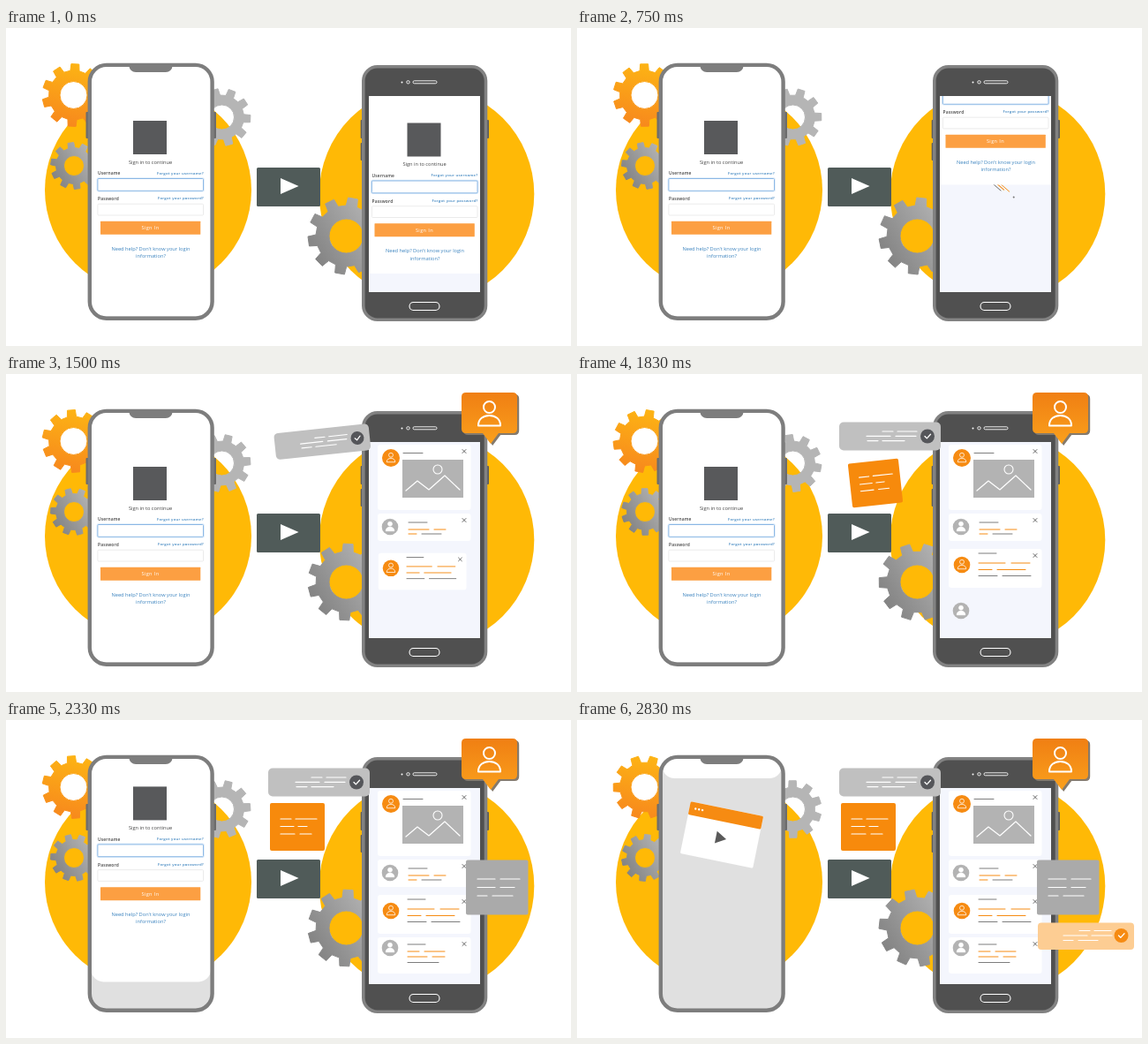
Write an HTML page that moves like this. It is 640 by 360 pixels and loops after 2.91 s.

```html
<!DOCTYPE html>
<html lang="en">
<head>
<meta charset="utf-8">
<title>App sign-in</title>
<style>
html, body { margin: 0; width: 100%; height: 100%; overflow: hidden; background: #fff; }
svg { display: block; width: 100vw; height: 100vh; font-family: "Open Sans", sans-serif; }
</style>
</head>
<body>
<svg id="stage" viewBox="0 0 640 360" xmlns="http://www.w3.org/2000/svg"></svg>
<script>
const LOOP = 2910, STEP = 1000 / 12;
const ORANGE = '#f68b12', GREY = '#b3b3b3', DARK = '#7d7d7d';

const rect = (x, y, w, h, r, fill, more = '') =>
  `<rect x="${x}" y="${y}" width="${w}" height="${h}" rx="${r}" fill="${fill}" ${more}/>`;
const disc = (x, y, r, fill, more = '') =>
  `<circle cx="${x}" cy="${y}" r="${r}" fill="${fill}" ${more}/>`;
const stroke = (d, color, w = 1) =>
  `<path d="${d}" fill="none" stroke="${color}" stroke-width="${w}" stroke-linecap="round" stroke-linejoin="round"/>`;
const text = (x, y, size, fill, str, more = '') =>
  `<text x="${x}" y="${y}" font-size="${size}" fill="${fill}" ${more}>${str}</text>`;
const group = (id, body) => `<g id="${id}">${body}</g>`;
const bar = (x1, x2, y, color = '#fff', w = 1.2) => stroke(`M${x1} ${y}H${x2}`, color, w);
const gradient = (id, a, b, dir) =>
  `<linearGradient id="${id}" ${dir}><stop stop-color="${a}"/><stop offset="1" stop-color="${b}"/></linearGradient>`;

// Gears turn at one shared speed; turn is the first angle in degrees
const TEETH = 10, SPIN = 3.6;
const gears = [
  { x: 76.5, y: 76, outer: 35.5, inner: 28, hole: 15.5, turn: -87, fill: 'url(#gOrange)' },
  { x: 77, y: 156, outer: 26.5, inner: 20.5, hole: 11.5, turn: -98, fill: 'url(#gSteel)' },
  { x: 244.5, y: 101, outer: 32.5, inner: 25, hole: 14, turn: -69, fill: '#b5b5b5' },
  { x: 385.5, y: 235.5, outer: 43.5, inner: 34.5, hole: 19.5, turn: -80, fill: 'url(#gSteel)' }
];

function gearPath(g, turn) {
  const pitch = 360 / TEETH, pts = [];
  for (let i = 0; i < TEETH; i++) {
    for (const [k, r] of [[-.29, g.inner], [-.2, g.outer], [.2, g.outer], [.29, g.inner]]) {
      const a = (turn + (i + k) * pitch) * Math.PI / 180;
      pts.push((g.x + r * Math.cos(a)).toFixed(2) + ' ' + (g.y + r * Math.sin(a)).toFixed(2));
    }
  }
  const h = g.hole;
  return `M${pts.join('L')}zM${g.x - h} ${g.y}a${h} ${h} 0 1 0 ${2 * h} 0a${h} ${h} 0 1 0 ${-2 * h} 0z`;
}

const gearArt = g => `<path class="gear" fill="${g.fill}" fill-rule="evenodd"
  stroke="${g.fill}" stroke-width="1" stroke-linejoin="round"/>`;

function person(x, y, s, fill = 'none') {
  return `<g transform="translate(${x} ${y}) scale(${s})">` +
    `<g fill="${fill}" stroke="#fff" stroke-width="2" stroke-linejoin="round">` +
    `<circle cy="-7.5" r="6.5"/><path d="M-12.5 13.5C-13 -2 13 -2 12.5 13.5z"/></g></g>`;
}

const check = (x, y, fill) =>
  disc(x, y, 8, fill) + stroke(`M${x - 3} ${y}l2.3 2.4l4.2 -4.6`, '#fff', 1.3);

function login() {
  const blue = '#3d84bf', ink = '#444', mid = 'text-anchor="middle"';
  const label = 'font-weight="600" letter-spacing=".15"';
  const end = 'text-anchor="end" font-weight="600" letter-spacing=".24"';
  return rect(144, 105, 38, 38, 0, '#58595b') +
    text(163.5, 153.5, 5.7, ink, 'Sign in to continue', mid) +
    text(104, 166.3, 4.9, ink, 'Username', label) +
    text(224, 165.6, 4.3, blue, 'Forgot your username?', end) +
    rect(103.2, 169.8, 121, 15.2, 1.5, 'none', 'stroke="#dcebf9" stroke-width="1.2"') +
    rect(103.9, 170.5, 119.6, 13.8, 1, '#fff', 'stroke="#7fb0e2" stroke-width=".9"') +
    text(104, 195.1, 4.9, ink, 'Password', label) +
    text(224, 194.4, 4.3, blue, 'Forgot your password?', end) +
    rect(103.9, 199.2, 119.6, 12.8, 1, '#fff', 'stroke="#e6e6e6" stroke-width=".8"') +
    rect(107, 218.8, 113.3, 15, .5, '#fc9f42') +
    text(163.5, 228.4, 5.6, '#fff', 'Sign In', mid + ' letter-spacing=".4"') +
    text(164, 251.8, 5.7, blue, 'Need help? Don\'t know your login', mid) +
    text(164, 260, 5.7, blue, 'information?', mid);
}

// Feed cards: avatar place, box, first frame, text bars as [x1, x2, y, colour]
const cards = [
  { ax: 436, ay: 95, top: 80, h: 74, color: ORANGE, start: 7.5, bars: [[450, 472, 89.5, DARK]] },
  { ax: 435, ay: 173, top: 158, h: 31, color: GREY, start: 11.5,
    bars: [[456, 477, 168, DARK], [456, 479, 176, ORANGE], [485, 498, 176, ORANGE],
           [456, 465, 181, ORANGE], [471, 493, 181, DARK]] },
  { ax: 436, ay: 216, top: 198, h: 44, color: ORANGE, start: 13.45,
    bars: [[455, 475, 203, DARK], [455, 485, 214, ORANGE], [492, 513, 214, ORANGE],
           [455, 470, 221.5, ORANGE], [476, 508, 221.5, ORANGE], [455, 476, 228.5, DARK], [482, 514, 228.5, DARK]] },
  { ax: 435, ay: 258, top: 246, h: 41, color: GREY, start: 19,
    bars: [[455, 475, 254, DARK], [455, 468, 262, ORANGE], [474, 497, 262, ORANGE],
           [455, 477, 268, ORANGE], [483, 497, 268, ORANGE], [455, 490, 274.5, DARK]] }
];

function cardArt(c, i) {
  const y = c.top + 7.5;
  let body = rect(421, c.top, 105.5, c.h, 3, '#fff');
  for (const [a, b, h, color] of c.bars) body += bar(a, b, h, color, 1);
  body += stroke(`M517 ${y - 2}l4 4m0 -4l-4 4`, '#555', .9);
  if (!i) {
    body += rect(449, 97, 69, 43, 0, GREY) + stroke('M453 132L466 121L479 131L497 115L514 131', '#fff', 1.2) +
      disc(489, 108, 5, 'none', 'stroke="#fff" stroke-width="1.1"');
  }
  const streak = bar(9, 22, -2.5, '#666', .9) + bar(12, 31, 1, ORANGE, 1.1) +
    bar(17, 29, 4, '#666', .9) + bar(25, 37, -1.5, ORANGE, .9) + disc(45, 0, 1, '#777');
  return group('card' + i, body) + group('streak' + i, streak) +
    group('face' + i, disc(0, 0, i ? 9.3 : 10, c.color) +
      person(0, -.4, .38, c.color === GREY ? '#fff' : 'none'));
}

const bubble = (x, y, fill) =>
  `<path transform="translate(${x} ${y})" fill="${fill}" d="M521 21H574q5 0 5 5V62q0 5 -5 5H558L549 79L540 67H521q-5 0 -5 -5V26q0 -5 5 -5z"/>`;

// Floating parts: pivot, first offset, first turn, first scale, first frame
const parts = [
  { id: 'bubble', x: 549, y: 80, dx: -12, dy: -4, turn: -50, size: 0, start: 11.5,
    art: bubble(2.2, 2, '#857a6c') + bubble(0, 0, 'url(#gBubble)') + person(547.5, 45, 1) },
  { id: 'done', x: 412, y: 71, dx: 0, dy: 4, turn: -48, size: .5, start: 16,
    art: rect(297, 54.5, 115, 32, 5, '#c0c0c0') + bar(346, 358, 65) + bar(363, 385, 65) +
      bar(328, 355, 70.3) + bar(361, 384, 70.3) + bar(329, 341, 75.6) + bar(346, 371, 75.6) +
      check(397, 70.5, '#55565a') },
  { id: 'memo', x: 330, y: 121, dx: 64, dy: 20, turn: -50, size: .4, start: 20,
    art: rect(299, 94, 62, 54, 2, '#f78a0c') + bar(311, 323, 112) + bar(328, 352, 112) +
      bar(311, 326, 120.5) + bar(331, 341, 120.5) + bar(311, 327, 129) + bar(333, 346, 129) },
  { id: 'note', x: 556, y: 189, dx: -56, dy: -96, turn: -70, size: .5, start: 24,
    art: rect(521, 158.5, 70.5, 62, 2, '#aaa') + bar(534, 554, 180) + bar(560, 582, 180) +
      bar(534, 554, 189.5) + bar(560, 576, 189.5) + bar(534, 545, 199) + bar(551, 574, 199) },
  { id: 'ready', x: 521, y: 245, dx: 0, dy: 2, turn: -56, size: .4, start: 28,
    art: rect(522, 229.5, 109, 30.5, 4, '#fdcd93') + bar(569, 581, 238.5) + bar(586, 605, 238.5) +
      bar(551, 578, 244) + bar(583, 606, 244) + bar(551, 562, 249.5) + bar(568, 590, 249.5) +
      check(616.5, 244, ORANGE) }
];

const video = rect(-42, -30, 84, 60, 1.5, '#fff') + rect(-42, -30, 84, 15, 1.5, ORANGE) +
  disc(-35, -23, 1.2, '#fff') + disc(-31, -23, 1.2, '#fff') + disc(-27, -23, 1.2, '#fff') +
  '<path d="M-6 -3L6 4L-6 11z" fill="#5a5a5a"/>';

const stage = document.getElementById('stage');
stage.innerHTML =
  '<defs>' +
  gradient('gOrange', '#fdb414', '#f7881d', 'x1=".6" y1="0" x2=".4" y2="1"') +
  gradient('gSteel', '#7f7f7f', '#b9b9b9', 'x1="0" y1=".8" x2="1" y2=".2"') +
  gradient('gBubble', '#f07f13', '#faa01c', 'x1="0" y1="0" x2="0" y2="1"') +
  '<clipPath id="left">' + rect(96.5, 44, 135.5, 282, 15, '#000') + '</clipPath>' +
  '<clipPath id="right">' + rect(411, 77, 126, 222, 0, '#000') + '</clipPath></defs>' +
  rect(0, 0, 640, 360, 0, '#fff') +
  disc(161, 183.5, 117, '#ffb906') + disc(476.5, 188, 121.8, '#ffb906') +
  gears.map(gearArt).join('') +
  // left phone
  rect(90.5, 95, 4, 30, 1, '#6c6c6c') + rect(234, 95, 4, 30, 1, '#6c6c6c') +
  rect(94.8, 41.9, 138.8, 286.8, 19, '#e0e0e0') +
  '<g clip-path="url(#left)">' +
  group('leftPage', rect(96.5, 30, 135.5, 296, 14, '#fff') + login()) + group('video', video) + '</g>' +
  rect(94.8, 41.9, 138.8, 286.8, 19, 'none', `stroke="${DARK}" stroke-width="4.4"`) +
  `<path d="M139 42H189Q187.500 50 181 50H147Q140.500 50 139 42z" fill="${DARK}"/>` +
  // right phone
  rect(401.7, 104, 4, 21, 1, '#5c5c5c') + rect(401.7, 130, 4, 20, 1, '#5c5c5c') +
  rect(543, 104, 4, 21, 1, '#5c5c5c') +
  rect(404.8, 43.8, 138.7, 286.4, 16, '#505050', 'stroke="#828282" stroke-width="3.6"') +
  disc(448.5, 61.5, 1, '#fff') + disc(455.5, 61.3, 1.7, 'none', 'stroke="#fff" stroke-width=".9"') +
  rect(461, 59.8, 27, 3, 1.5, 'none', 'stroke="#fff" stroke-width=".9"') +
  rect(457, 310.5, 34, 9, 4.5, 'none', 'stroke="#fff" stroke-width="1.1"') +
  rect(411, 77, 126, 222, 0, '#f4f6fd') +
  '<g clip-path="url(#right)">' + cards.map(cardArt).join('') +
  group('rightPage', rect(411, 70, 126, 208, 0, '#fff') +
    `<g transform="translate(310.500 2.500)">${login()}</g>`) + '</g>' +
  parts.map(p => group(p.id, p.art)).join('') +
  rect(284, 158, 72, 44, 1.5, '#505b59') + '<path d="M311 170L331.500 179L311 188z" fill="#fff"/>';

const el = {};
stage.querySelectorAll('g[id]').forEach(g => el[g.id] = g);
const wheels = stage.querySelectorAll('.gear');

const clamp = v => Math.max(0, Math.min(1, v));
const easeOut = u => 1 - (1 - u) ** 3;
const lift = x => x > 0 ? 260 * (x / 10.5) ** 2.565 : 0;

function place(id, shown, transform) {
  el[id].setAttribute('visibility', shown ? 'visible' : 'hidden');
  el[id].setAttribute('transform', transform);
}

function moveCard(c, i, f) {
  const t = clamp((f - c.start) / 3), u = clamp((f - c.start - 3) / 2.5), e = easeOut(u), q = 1 - t;
  const x0 = c.ax + 65, y0 = c.ay + 102;
  const x = q * q * x0 + 2 * t * q * (c.ax + 17) + t * t * c.ax;
  const y = q * q * y0 + 2 * t * q * (c.ay + 78) + t * t * (c.ay + 10) - 10 * u;
  const angle = Math.atan2(y0 - y, x0 - x) * 180 / Math.PI;
  place('face' + i, t > 0, `translate(${x} ${y}) scale(${.1 + .9 * t})`);
  place('streak' + i, t > 0 && t < 1, `translate(${x} ${y}) rotate(${angle})`);
  place('card' + i, u > 0, `translate(${c.ax} ${y}) scale(${e}) translate(${-c.ax} ${-c.ay})`);
}

function movePart(p, f) {
  const u = clamp((f - p.start) / 4), e = easeOut(u), r = 1 - e;
  place(p.id, u > 0, `translate(${p.x + p.dx * r} ${p.y + p.dy * r}) rotate(${p.turn * r}) ` +
    `scale(${p.size + (1 - p.size) * e}) translate(${-p.x} ${-p.y})`);
}

function draw(now) {
  const f = Math.floor((now % LOOP + 4.5) / STEP);
  gears.forEach((g, i) => wheels[i].setAttribute('d', gearPath(g, g.turn + SPIN * f)));
  place('leftPage', true, `translate(0 ${-lift(f - 23.5)})`);
  place('rightPage', f < 13, `translate(0 ${-lift(f - 1.75)})`);
  cards.forEach((c, i) => moveCard(c, i, f));
  parts.forEach(p => movePart(p, f));
  const v = easeOut(clamp((f - 31) / 3));
  place('video', v > 0, `translate(164 ${130 + 60 * (1 - v)}) rotate(${11.5 + 20 * (1 - v)}) scale(${v})`);
}

function tick() {
  draw(performance.now());
  requestAnimationFrame(tick);
}
tick();
</script>
</body>
</html>
```
